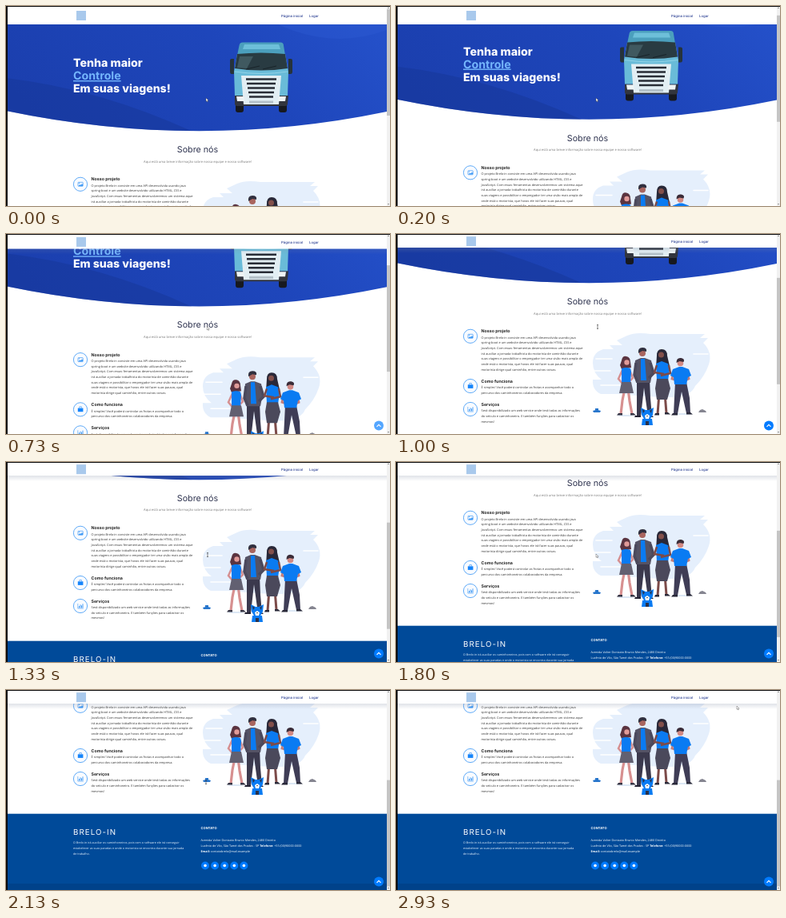
Recreate the animation shown at these times as an HTML page. Size 480 by 250 pixels, loop 2990 ms.

```html
<!DOCTYPE html>
<html lang="pt-BR">
<head>
<meta charset="utf-8">
<title>Página inicial</title>
<style>
  html, body { margin: 0; width: 100%; height: 100%; overflow: hidden; background: #fff; }
  svg { display: block; width: 480px; height: 250px; }
  text { font-family: "Open Sans", "Noto Sans", sans-serif; text-rendering: geometricPrecision; white-space: pre; }
  .head { font-family: Inter, "Noto Sans", sans-serif; }
  .bold { font-weight: 700; }
</style>
</head>
<body>
<svg viewBox="0 0 480 250">
  <defs>
    <linearGradient id="sky" x1="0" y1=".6" x2="1" y2=".3">
      <stop offset="0" stop-color="#1b3fae"/><stop offset=".6" stop-color="#1e46bb"/><stop offset="1" stop-color="#2450c9"/>
    </linearGradient>
    <linearGradient id="shade" x1="0" y1="0" x2="0" y2="1">
      <stop offset="0" stop-color="#7f89a1" stop-opacity=".24"/><stop offset="1" stop-color="#7f89a1" stop-opacity="0"/>
    </linearGradient>
    <clipPath id="heroShape"><path d="M0 0H476V132Q240 181 0 131Z"/></clipPath>
  </defs>
  <rect width="480" height="250" fill="#fff"/>

  <g id="page">
    <g clip-path="url(#heroShape)">
      <rect width="476" height="160" fill="url(#sky)"/>
      <path d="M0 90Q120 104 240 160H0Z" fill="#173798" opacity=".5"/>
      <path d="M300 0Q390 62 476 30V0Z" fill="#2f5bd3" opacity=".4"/>
    </g>

    <g id="truck">
      <path d="M287 122h10v8q0 3-3 3h-4q-3 0-3-3zM341 122h10v8q0 3-3 3h-4q-3 0-3-3z" fill="#17191f"/>
      <path d="M280 68q0-2 2-2h3v19h-3q-2 0-2-3zM353 66h3q2 0 2 2v14q0 3-2 3h-3z" fill="#26333b"/>
      <path d="M286 112h67l-1 10q0 3-3 3H289q-3 0-3-3z" fill="#32353e"/>
      <path d="M289 60h60l4 22-1 30H286l-1-30z" fill="#69bbd8"/>
      <path d="M296 45.500h47q4 0 4 4l2 12H289l2.500-12q.5-4 4.500-4z" fill="#4b9fbd"/>
      <path d="M298 48h43l2 6h-47z" fill="#6dbfd9"/>
      <path d="M289 60q30-3 60 0l3 18q-33 5-66 0z" fill="#293b42"/>
      <path d="M292 63h17l-8 15-12-1z" fill="#405960"/>
      <path d="M300 79l17-4M321 79l17-4" stroke="#11191d" stroke-width=".7"/>
      <path d="M286 82q33 5 66 0" fill="none" stroke="#91d3e7"/>
      <path d="M294 87h50l-3 36h-44z" fill="#e2eef3"/>
      <path d="M300 91.500h38M301 97h36M302 102.500h34M303 108h32M304 113.500h30" stroke="#282d36" stroke-width="2.500"/>
      <path d="M288 113h9l1 6h-9zM341 113h9l-1 6h-9z" fill="#eef4f5"/>
      <path d="M304 118.500h30v3h-30z" fill="#b4c1c9"/>
    </g>

    <g id="team">
      <path d="M289 222Q300 217 318 220H386L380 225H390L384 231Q396 243 391 258T374 285Q368 300 338 299T282 295H256Q245 290 246 277H257Q246 269 246 256T259 239H272L267 234H283L276 228Z" fill="#e5effc"/>
      <path d="M250 251H270M246 266H268M256 284H280M372 245H390" stroke="#fff" stroke-width="1.500" stroke-linecap="round"/>
      <g fill="#dbe7f5"><ellipse cx="287" cy="322" rx="10" ry="1"/><ellipse cx="358" cy="320" rx="12" ry="1"/></g>

      <g id="womanLeft">
        <path d="M286 288l-3 15-2 17M290 288l2 16 3 16" fill="none" stroke="#d79090" stroke-width="3.200"/>
        <path d="M283 265l-5 11 6 7M292 265l4 10-5 5" fill="none" stroke="#d79090" stroke-width="2.500"/>
        <path d="M282 253q1-6 6-5 5 1 5 7l1 7-12 2-2-5z" fill="#5b3440"/>
        <circle cx="288.500" cy="255.500" r="3.200" fill="#e09a98"/>
        <path d="M282 263l4-1h3l4 1 1 4-1 15h-11z" fill="#0a7bf2"/>
        <path d="M282 280h12l3 14h-18z" fill="#626071"/>
        <path d="M278 319h5v2.500h-7zM293 319h4l3 2.500h-7z" fill="#353444"/>
      </g>
      <g id="manLeft">
        <path d="M301 276h16l1 24 2 23h-5l-5-36-4 36h-5z" fill="#3b394d"/>
        <path d="M299 253l7-3h5l8 3 2 12-3 16h-18l-2-16z" fill="#555365"/>
        <path d="M306 251h5l2 27h-7z" fill="#0a7bf2"/>
        <path d="M300 256l-2 15 4 9M318 256l4 13-6 6" fill="none" stroke="#4b495c" stroke-width="3.500"/>
        <circle cx="308" cy="244" r="4" fill="#a9655f"/>
        <path d="M303 244q-1-7 5-7t5 5l-5-1z" fill="#31303f"/>
        <path d="M299 322h7v2h-8zM314 322h6l2 2h-8z" fill="#242333"/>
      </g>
      <g id="womanRight">
        <path d="M329 294l-2 26M336 294l2 25" stroke="#7c4b49" stroke-width="3"/>
        <path d="M326 247q0-8 6-8 7 0 7 8l3 13-9 3-8-1z" fill="#292838"/>
        <circle cx="331.500" cy="246" r="3.500" fill="#83504b"/>
        <path d="M325 257l7-3 8 3 2 8-2 13h-14z" fill="#0a7bf2"/>
        <path d="M326 259l-3 9 12 2M341 259l2 10-12 3" fill="none" stroke="#7c4b49" stroke-width="2.500"/>
        <path d="M326 276h14l3 12-4 14h-13l-2-14z" fill="#4b495b"/>
        <path d="M324 319h5v2.500h-6zM336 318h4l3 2.500h-7z" fill="#292838"/>
      </g>
      <g id="manRight">
        <path d="M349 280h14l4 20 1 19h-5l-6-27-5 28h-5l1-20z" fill="#3f3d56"/>
        <path d="M347 267l-2 9 10 3M364 267l2 9-9 4" fill="none" stroke="#c47c78" stroke-width="2.800"/>
        <path d="M346 264l8-3h4l8 3 3 8-4 2-2 9h-15l-1-9-4-2z" fill="#0a7bf2"/>
        <circle cx="355.500" cy="256.500" r="3.800" fill="#d28984"/>
        <path d="M350.500 256q0-7 6-6 5 1 3 5l-5-1z" fill="#3a2c38"/>
        <path d="M346 319h6v2.500h-8zM363 318h5l3 2.500h-8z" fill="#292838"/>
      </g>
      <g id="dog">
        <path d="M308 326h12l1 8h-14z" fill="#0a7bf2"/>
        <path d="M306 312l6 3h4l6-3-1 9-3 5-4 2-4-2-3-5z" fill="#0a7bf2"/>
        <path d="M308 314l3 2-2 3zM320 314l-3 2 2 3zM312 329h4v5h-4z" fill="#29324c"/>
        <path d="M311 322l3-2 3 2-1 4h-4z" fill="#fff"/>
        <path d="M313 322h2l-1 1.500z" fill="#222"/>
      </g>
      <path d="M246 316q5-2 10 0l-1 2h-8zM249 313h4v3h-4z" fill="#2876cc"/>
      <path d="M378 318l2-3 3-1 4 2 1 2z" fill="#858590"/>
    </g>

    <g id="icons" stroke="#3b97f5" fill="none">
      <g fill="#f8fbff" stroke-width=".8"><circle cx="93" cy="222.800" r="8.600"/><circle cx="93" cy="285" r="8.600"/><circle cx="93" cy="314" r="8.600"/></g>
      <rect x="90" y="220.300" width="6.200" height="5" rx=".5" stroke-width=".7"/>
      <path d="M90.500 225l2-2 1 1 1.500-2 1 1.500v1.500zM91 221h1v1h-1z" fill="#3b97f5" stroke="none"/>
      <path d="M89.800 283.300h6.600v4.600h-6.600z" fill="#1685fb" stroke="none"/>
      <path d="M91.800 283v-1.400h2.600v1.400" stroke-width=".7"/>
      <path d="M89.800 311v6h7" stroke-width=".6"/>
      <path d="M91.500 316.300v-2.300M93 316.300v-4M94.500 316.300v-3M96 316.300v-5" stroke-width=".9"/>
    </g>

    <rect y="357.700" width="476" height="96" fill="#004a99"/>
    <rect y="445" width="476" height="10" fill="#00428a"/>
    <g id="social"></g>
    <g id="copy"></g>
  </g>

  <rect id="shadow" width="476" height="7" fill="url(#shade)"/>
  <rect id="bar" width="476" height="23" fill="#fff"/>
  <g id="menu">
    <rect x="88" y="6" width="12" height="12" fill="#a9c9ec"/>
  </g>
  <g id="toTop">
    <circle cx="466" cy="239.500" r="6" fill="#007bff"/>
    <path d="M463.500 240.800l2.500-2.500 2.500 2.500" fill="none" stroke="#fff" stroke-width="1.200"/>
  </g>
  <rect x="476" width="4" height="250" fill="#f1f1f1"/>
  <path d="M477 2.800l1-1.300 1 1.300zM477 247.200l1 1.300 1-1.300z" fill="#555"/>
  <rect id="thumb" x="476" y="4" width="4" height="133" fill="#c5c5c5"/>
  <path d="M0 0H480V1H2V250H0Z" fill="#0b0b0d"/>
  <path id="arrow" d="M0 0v4.300l1-.9.7 1.500.7-.3-.7-1.500h1.400z" fill="#fff" stroke="#444" stroke-width=".4"/>
  <path id="beam" d="M-1-2.400h2M0-2.400v4.800M-1 2.400h2" fill="none" stroke="#333" stroke-width=".6"/>
</svg>
<script>
const LOOP = 2990, STEP = 1000 / 15;
const $ = id => document.getElementById(id);

function add(parent, tag, attrs, content = "") {
  const node = document.createElementNS("http://www.w3.org/2000/svg", tag);
  for (const key in attrs) node.setAttribute(key, attrs[key]);
  node.innerHTML = content;
  return $(parent).appendChild(node);
}
const write = (x, y, size, fill, content, more = {}) =>
  add("copy", "text", { x, y, "font-size": size, fill, ...more }, content);
const lines = (x, y, size, fill, gap, list) =>
  list.forEach((line, i) => write(x, y + i * gap, size, fill, line));

const bold = { class: "head bold" }, heavy = { class: "head", "font-weight": 800 };
const centred = { "text-anchor": "middle" };

write(84, 76, 14.2, "#fff", "Tenha maior", heavy);
write(84, 92, 14.2, "#74b5fc", "Controle", { ...bold, "text-decoration": "underline" });
write(84, 108, 14.1, "#fff", "Em suas viagens!", heavy);

write(239.5, 183, 10.7, "#2f3450", "Sobre nós", { ...centred, class: "head" });
write(239.5, 195.5, 4.1, "#777", "Aqui está uma breve informação sobre nossa equipe e nosso software!", centred);

const sections = [
  ["Nosso projeto", 218.4, 225.8, [
    "O projeto Brelo-in consiste em uma API desenvolvida usando java",
    "spring-boot e um website desenvolvido utilizando HTML, CSS e",
    "JavaScript. Com essas ferramentas desenvolveremos um sistema aque",
    "irá auxiliar a jornada trabalhista do motorista de caminhão durante",
    "suas viagens e possibilitar o empregador ter uma visão mais ampla de",
    "onde está o motorista, que horas ele irá fazer suas pausas, qual",
    "motorista dirige qual caminhão, entre outras coisas."]],
  ["Como funciona", 280.8, 288.2, [
    "É simples! Você poderá controlar as frotas e acompanhar todo o",
    "percurso dos caminhoneiros colaboradores da empresa."]],
  ["Serviços", 309.8, 317.2, [
    "Será disponibilizado um web service onde terá todas as informações",
    "do veículo e caminhoneiro. E também funções para cadastrar os",
    "mesmos!"]]
];
for (const [title, titleY, textY, list] of sections) {
  write(106.5, titleY, 5.3, "#222", title, bold);
  lines(106.5, textY, 3.88, "#333", 6.65, list);
}

write(84, 384, 9.7, "#fff", "BRELO-IN", { class: "head", "letter-spacing": 1.1 });
lines(84, 395.2, 3.68, "#ecf5ff", 6.7, [
  "O Brelo-in irá auxiliar os caminhoneiros, pois com o software ele irá conseguir",
  "estabelecer as suas paradas e onde o motorista se encontra durante sua jornada",
  "de trabalho."]);
write(243.5, 377.4, 4.1, "#fff", "CONTATO", bold);
lines(243.5, 391.8, 3.74, "#fff", 7.1, [
  "Avenida Valter Donizato Brunio Mendes, 2480 Distrito",
  'Lucênio de Vilo, São Tamé dos Prados - SP <tspan class="bold">Telefone:</tspan> +55 (00)90000-0000',
  '<tspan class="bold">Email:</tspan> contatobrelo@mail.example']);

for (let i = 0; i < 5; i++) {
  const cx = 249 + 12.1 * i;
  add("social", "circle", { cx, cy: 422.5, r: 5, fill: "#007bff" });
  add("social", "circle", { cx, cy: 422.5, r: 1.8, fill: "#fff" });
}
for (const [x, label] of [[344, "Página inicial"], [379, "Logar"]])
  add("menu", "text", { x, y: 13.6, "font-size": 4.3, fill: "#283d91", class: "head", "font-weight": 500 }, label);

// Each key is [time, value, ...]; values are interpolated linearly.
function track(keys, t) {
  if (t <= keys[0][0]) return keys[0].slice(1);
  for (let i = 1; i < keys.length; i++) {
    const [a, ...from] = keys[i - 1], [b, ...to] = keys[i];
    if (t <= b) return from.map((v, k) => v + (to[k] - v) * (t - a) / (b - a));
  }
  return keys[keys.length - 1].slice(1);
}
const scrollKeys = [[0, 0], [400, 29], [1000, 95], [1333, 134], [1800, 153], [2133, 203]];
const pointerKeys = [[0, 250, 115], [400, 250, 115], [950, 252, 116], [1333, 252, 116], [1800, 250, 115],
  [2133, 250, 115], [2400, 254, 217], [2530, 300, 215], [2667, 359, 193], [2933, 426, 20]];
const textZones = [[210, 266], [276, 296], [305, 331]];

const clamp = v => Math.max(0, Math.min(1, v));
const smooth = v => v * v * (3 - 2 * v);
const move = (id, x, y) => $(id).setAttribute("transform", `translate(${x} ${y})`);

function render(time) {
  const t = Math.floor((time % LOOP + 5) / STEP) * STEP;
  const [scroll] = track(scrollKeys, t);
  const [x, y] = track(pointerKeys, t);
  const shrink = smooth(clamp((t - 400) / 500));
  const barHeight = 23 - 6 * shrink;

  move("page", 0, -scroll);
  $("bar").setAttribute("height", barHeight);
  move("shadow", 0, barHeight);
  $("shadow").setAttribute("opacity", shrink);
  move("menu", 0, -2.8 * shrink);
  $("toTop").setAttribute("opacity", clamp((t - 400) / 500));
  move("thumb", 0, scroll * 0.535);

  const onText = x > 105 && x < 253 && textZones.some(([a, b]) => y + scroll > a && y + scroll < b);
  $("arrow").setAttribute("visibility", onText ? "hidden" : "visible");
  $("beam").setAttribute("visibility", onText ? "visible" : "hidden");
  move("arrow", x, y);
  move("beam", x, y);
}

const start = performance.now();
function tick() {
  render(performance.now() - start);
  requestAnimationFrame(tick);
}
tick();
</script>
</body>
</html>
```
